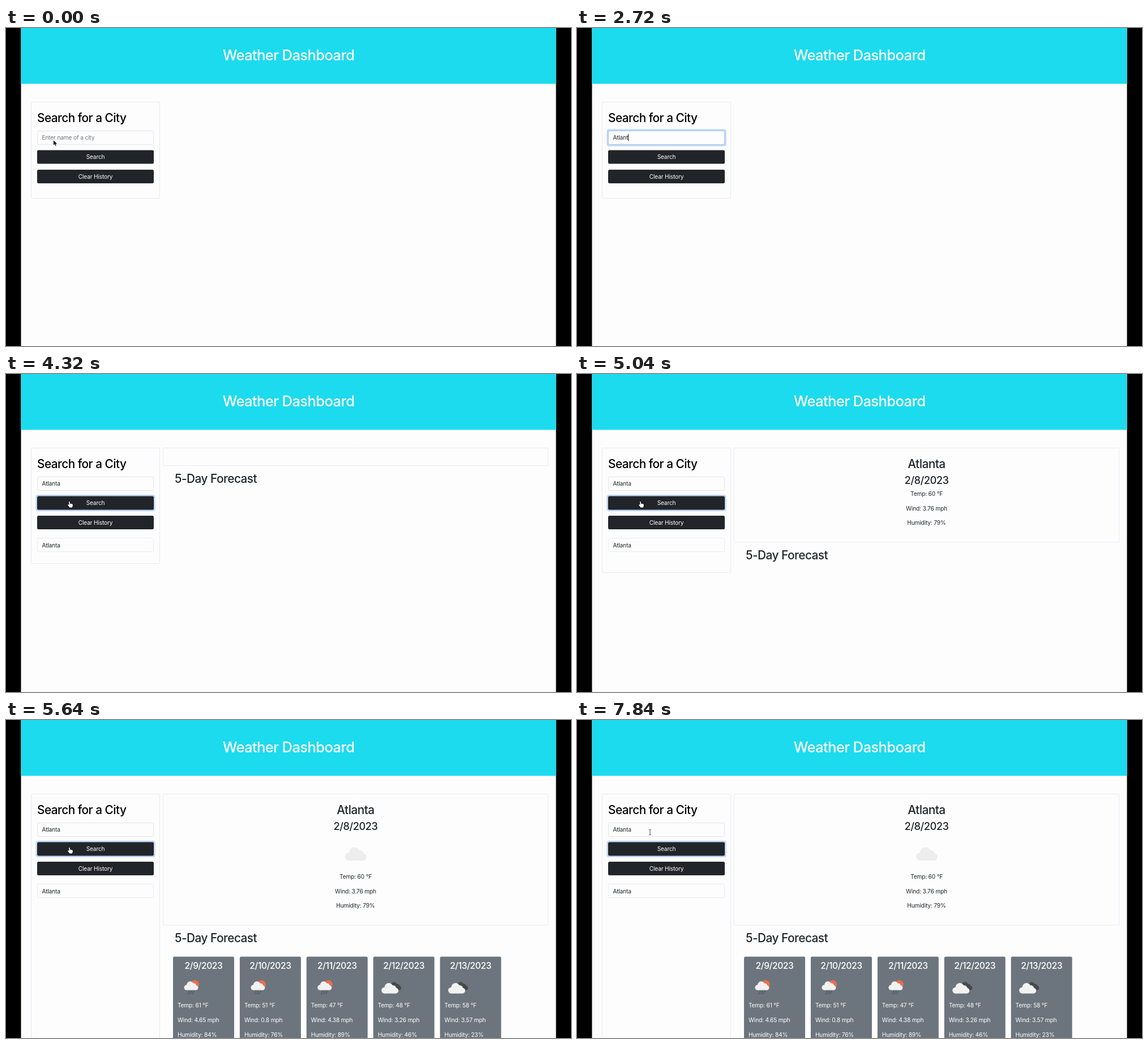
These frames come from a looping animation (998x561 px, 8000 ms). An HTML page with a canvas:

```html
<!DOCTYPE html>
<html lang="en">
<head>
<meta charset="utf-8">
<title>Weather Dashboard</title>
<style>
html, body { margin: 0; width: 100%; height: 100%; overflow: hidden; background: #000; }
canvas { display: block; width: 998px; height: 561px; }
</style>
</head>
<body>
<canvas id="stage" width="998" height="561"></canvas>
<script>
const ctx = document.getElementById('stage').getContext('2d');
const LOOP = 8000;
const INK = '#212529', EDGE = '#e9e9f8';
const TYPED = [[2000, 'A'], [2160, 'At'], [2280, 'Atl'], [2400, 'Atla'], [2520, 'Atlan'], [2720, 'Atlant'], [2920, 'Atlanta']];
const DAYS = [
  ['2/9/2023', '61', '4.65', 84, rainIcon],
  ['2/10/2023', '51', '0.8', 76, rainIcon],
  ['2/11/2023', '47', '4.38', 89, rainIcon],
  ['2/12/2023', '48', '3.26', 46, cloudyIcon],
  ['2/13/2023', '58', '3.57', 23, cloudyIcon]
];

const clamp = v => Math.max(0, Math.min(1, v));
const progress = (t, from, to) => clamp((t - from) / (to - from));
const ease = p => p * p * (3 - 2 * p);
const mix = (a, b, p) => a + (b - a) * p;

function text(str, x, y, size, { color = INK, weight = 400, align = 'left', track = -0.018 } = {}) {
  ctx.font = `${weight} ${size}px Inter, "Liberation Sans", sans-serif`;
  ctx.letterSpacing = `${track * size}px`;
  ctx.textAlign = align;
  ctx.textBaseline = 'alphabetic';
  ctx.fillStyle = color;
  ctx.fillText(str, x, y + size * 0.36);
}

const heading = (str, x, y, size, opts) => text(str, x, y, size, { weight: 500, track: -0.025, ...opts });

function box(x, y, w, h, r, fill, stroke) {
  ctx.beginPath();
  ctx.roundRect(x, y, w, h, r);
  if (fill) { ctx.fillStyle = fill; ctx.fill(); }
  if (stroke) { ctx.strokeStyle = stroke; ctx.lineWidth = 1; ctx.stroke(); }
}

function ring(x, y, w, h, alpha) {
  if (alpha <= 0) return;
  box(x - 2.5, y - 2.5, w + 5, h + 5, 4, `rgba(190,213,250,${alpha})`);
}

function circles(color, list) {
  ctx.fillStyle = color;
  for (const [x, y, r] of list) {
    ctx.beginPath();
    ctx.arc(x, y, r, 0, 7);
    ctx.fill();
  }
}

// Cloud with its base centre at (x, y) and width w.
function cloud(x, y, w, color) {
  const u = w / 30;
  circles(color, [[x - 9.5 * u, y - 5.5 * u, 5.5 * u], [x - 2 * u, y - 11 * u, 7.5 * u],
    [x + 5.5 * u, y - 9 * u, 5.5 * u], [x + 10 * u, y - 5 * u, 5 * u]]);
  ctx.fillRect(x - 9.5 * u, y - 9 * u, 19.5 * u, 9 * u);
}

function rainIcon(x, y) {
  circles('#ec6e4c', [[x + 38.5, y - 4, 7.5]]);
  cloud(x + 32, y + 6, 25, '#f2f2f2');
  ctx.strokeStyle = '#41474b';
  ctx.lineWidth = 1.4;
  ctx.beginPath();
  for (const [dx, dy] of [[29, 8], [33, 8], [37, 8], [27, 11], [31, 11], [35, 11]]) {
    ctx.moveTo(x + dx, y + dy);
    ctx.lineTo(x + dx - 1, y + dy + 2);
  }
  ctx.stroke();
}

function cloudyIcon(x, y) {
  cloud(x + 38, y + 6, 23, '#484848');
  cloud(x + 29.5, y + 12, 30, '#f2f2f2');
}

function readings(x, y, temp, wind, humidity, opts) {
  [`Temp: ${temp} °F`, `Wind: ${wind} mph`, `Humidity: ${humidity}%`]
    .forEach((line, i) => text(line, x, y + i * 25.9, 10.2, opts));
}

function card([date, temp, wind, humidity, icon], i, top) {
  const x = 295 + i * 117.9;
  box(x, top, 108, 156.5, 2.5, '#6c757d');
  heading(date, x + 54, top + 15.5, 15.6, { color: '#fff', align: 'center' });
  icon(x, top + 53);
  readings(x + 8, top + 86, temp, wind, humidity, { color: '#fff' });
}

function button(label, y, glow = 0) {
  ring(55, y, 206, 24, glow);
  box(55, y, 206, 24, 2.5, INK);
  text(label, 158, y + 12, 10.2, { color: '#fff', align: 'center' });
}

function searchPanel(t, bottom) {
  box(44.5, 130.5, 227, bottom - 130, 1, null, EDGE);
  heading('Search for a City', 55, 159, 20.8, { color: '#000' });

  const focus = progress(t, 660, 780) * (1 - progress(t, 4020, 4140));
  ring(55, 181, 206, 25, focus);
  box(55.5, 181.5, 205, 24, 2.5, '#fdfdfd', focus > 0.5 ? '#a9c8f5' : '#e2e5ea');
  const entry = TYPED.filter(([at]) => t >= at).pop();
  const value = entry ? entry[1] : '';
  text(value || 'Enter name of a city', 63.5, 193.5, 10.2, { color: value ? INK : '#70767c' });
  const caret = (t >= 680 && t < 1720) || (t >= 2000 && t < 3440);
  if (caret) {
    const end = value ? ctx.measureText(value).width : 0;
    ctx.fillStyle = '#000';
    ctx.fillRect(63.5 + end, 187, 1, 12);
  }

  button('Search', 215.5, progress(t, 4020, 4140));
  button('Clear History', 250);
  if (t >= 4080) {
    box(55.5, 289.5, 205, 24, 2, '#fdfdfd', EDGE);
    text('Atlanta', 63.5, 302, 10.2);
  }
}

function weatherPanel(t, bottom) {
  box(277.5, 130.5, 680, bottom - 130, 1, null, EDGE);
  if (t >= 5040) {
    const loaded = t >= 5640;
    heading('Atlanta', 617.5, 159, 20.8, { align: 'center' });
    heading('2/8/2023', 617.5, 187.5, 18.2, { align: 'center' });
    if (loaded) cloud(618, 248, 38, '#ededed');
    readings(617.5, loaded ? 276 : 211, '60', '3.76', 79, { align: 'center' });
  }
  heading('5-Day Forecast', 298, bottom + 23.5, 20.8);
  if (t >= 5120) DAYS.forEach((day, i) => card(day, i, bottom + 56));
}

function shape(x, y, points, fill, stroke, width) {
  ctx.beginPath();
  points.forEach(([dx, dy]) => ctx.lineTo(x + dx, y + dy));
  ctx.closePath();
  ctx.lineJoin = 'round';
  ctx.lineWidth = width;
  ctx.strokeStyle = stroke;
  ctx.stroke();
  ctx.fillStyle = fill;
  ctx.fill();
}

function arrow(x, y) {
  shape(x, y, [[0, 0], [0, 8.5], [2, 6.8], [3.4, 10], [4.8, 9.3], [3.4, 6.3], [6, 6]], '#111', '#fff', 1.2);
}

function hand(x, y) {
  shape(x, y, [[-2, -5], [-0.5, -5], [0, -1.5], [4.5, -0.5], [5, 2], [3.8, 5.5], [-0.5, 5.5], [-4, 1], [-3, 0], [-1.4, 1]],
    '#fff', '#111', 1.6);
}

function beam(x, y) {
  ctx.strokeStyle = '#555';
  ctx.lineWidth = 1;
  ctx.beginPath();
  ctx.moveTo(x - 2, y - 5);
  ctx.lineTo(x, y - 4);
  ctx.lineTo(x + 2, y - 5);
  ctx.moveTo(x, y - 4);
  ctx.lineTo(x, y + 4);
  ctx.moveTo(x - 2, y + 5);
  ctx.lineTo(x, y + 4);
  ctx.lineTo(x + 2, y + 5);
  ctx.stroke();
}

function pointer(t) {
  if (t < 1240) {
    const p = ease(progress(t, 0, 440));
    const x = mix(84, 88, p), y = mix(198, 194, p);
    p < 0.4 ? arrow(x, y) : beam(x, y);
  } else if (t >= 3160 && t < 6640) {
    const p = ease(progress(t, 3160, 3960));
    const x = mix(88, 113, p), y = mix(194, 230, p);
    if (y < 206) beam(x, y);
    else if (y < 215) arrow(x, y);
    else hand(x, y);
  } else if (t >= 6720) {
    const p = ease(progress(t, 6720, 7440));
    const x = mix(115, 129, p), y = mix(204, 198, p);
    beam(x, y);
  }
}

function draw(t) {
  ctx.fillStyle = '#000';
  ctx.fillRect(0, 0, 998, 561);
  ctx.save();
  ctx.beginPath();
  ctx.rect(26.5, 0, 945, 561);
  ctx.clip();
  ctx.fillStyle = '#fdfdfd';
  ctx.fillRect(26, 0, 946, 561);
  ctx.fillStyle = '#1cdbee';
  ctx.fillRect(26, 0, 946, 98.5);
  heading('Weather Dashboard', 499, 47.5, 25.6, { color: '#fff', align: 'center' });

  const bottom = t < 5040 ? 161 : t < 5640 ? 296.5 : 361.5;
  const side = t < 4080 ? 300 : t < 5040 ? 334 : t < 5120 ? 350 : bottom + 227;
  searchPanel(t, side);
  if (t >= 4080) weatherPanel(t, bottom);
  pointer(t);
  ctx.restore();
}

function tick(now) {
  draw(now % LOOP);
  requestAnimationFrame(tick);
}
requestAnimationFrame(tick);
</script>
</body>
</html>
```
